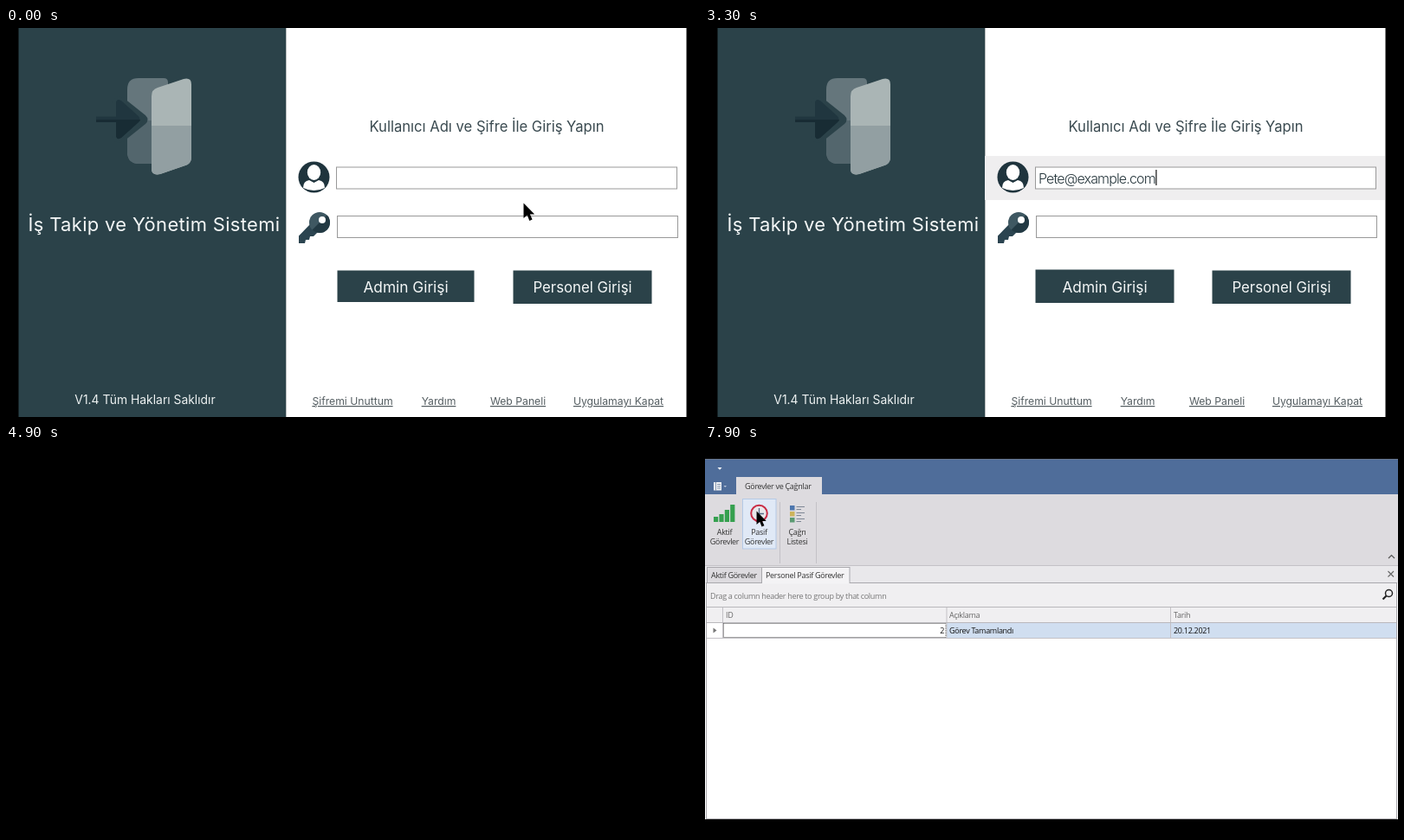
An HTML page for the animation above (8 s loop, 800 by 450 pixels).

```html
<!DOCTYPE html>
<html lang="tr">
<head>
<meta charset="utf-8">
<style>
html, body { margin: 0; width: 100%; height: 100%; overflow: hidden; background: #000; }
svg { display: block; width: 100%; height: 100%; }
text { white-space: pre; }
.login text { font-family: Montserrat, Inter, sans-serif; }
.app text { font: 9px Tahoma, "Open Sans", sans-serif; letter-spacing: -.3px; }
</style>
</head>
<body>
<svg id="stage" viewBox="0 0 800 450"></svg>
<script>
const LOOP = 8000, STEP = 100;
const DARK = '#2b4249', MAIL = 'Pete@example.com';
const typedAt = [1500, 1600, 1800, 2000, 2300, 2500];
while (typedAt.length < MAIL.length) typedAt.push(typedAt.at(-1) + 80);

const rect = (x, y, w, h, fill, more = '') =>
  `<rect x="${x}" y="${y}" width="${w}" height="${h}" fill="${fill}" ${more}/>`;
const path = (d, fill, more = '') => `<path d="${d}" fill="${fill}" ${more}/>`;
const line = (d, color, w = 1) => path(d, 'none', `stroke="${color}" stroke-width="${w}"`);
const circle = (x, y, r, fill, more = '') =>
  `<circle cx="${x}" cy="${y}" r="${r}" fill="${fill}" ${more}/>`;
const text = (s, x, y, fill, more = '') => `<text x="${x}" y="${y}" fill="${fill}" ${more}>${s}</text>`;
const mid = size => `text-anchor="middle" font-size="${size}"`;

// Position on a list of [time, x, y] points
function follow(points, t) {
  const i = points.findIndex(p => p[0] >= t);
  if (i < 0) return points.at(-1).slice(1);
  if (i === 0) return points[0].slice(1);
  const [a, b] = [points[i - 1], points[i]], k = (t - a[0]) / (b[0] - a[0]);
  return [a[1] + (b[1] - a[1]) * k, a[2] + (b[2] - a[2]) * k];
}

const shapes = {
  arrow: path('M-.5 -.5V17L3.7 13.400 6.300 20 9.600 18.600 6.900 12.400H12.200Z', '#000'),
  beam: line('M-3 -8Q0 -8 0 -6V6Q0 8 -3 8M3 -8Q0 -8 0 -6M0 6Q0 8 3 8', '#222'),
  hand: path('M-2 1Q0 -2 2 1V8L4 7 6 8 8 8 11 10V15L8 21H0L-3 15 -6 11Q-6 8 -2 11Z', '#fff',
    'stroke="#1a2428" stroke-width="1" stroke-linejoin="round"')
};
const cursor = (kind, [x, y], scale = 1) =>
  `<g transform="translate(${x} ${y}) scale(${scale})">${shapes[kind]}</g>`;

const door =
  path('M153 58H182Q187 58 187 63V157H154Q140 157 140 143V71Q140 58 153 58Z', '#65767c') +
  path('M140 107H187V157H154Q140 157 140 143Z', '#53666d') +
  path('M122 87Q126 76 136 81L161 101Q166 106 161 111L136 131Q126 136 122 125Z', DARK) +
  path('M104 102.500H127V86Q128 81 133 84L153 102Q156 105.500 153 109L133 127Q128 130 127 125V109H104Z', '#20363f') +
  path('M104 106H155Q155 107.500 153 109L133 127Q128 130 127 125V109H104Z', '#182c34') +
  path('M168 79Q168 71 175 69L205 59Q214 57 214 65V149Q214 157 207 159L178 169Q168 171 168 163Z', '#aab5b5') +
  path('M168 113H214V149Q214 157 207 159L178 169Q168 171 168 163Z', '#929fa2');

const userIcon = circle(355.5, 172.5, 18, '#1f343d') +
  path('M343 185Q343 177 350 176L355.500 179 361 176Q368 177 368 185Q355.500 191 343 185Z', '#fff') +
  '<ellipse cx="355.5" cy="167" rx="7.7" ry="9" fill="#fff"/>';
const keyIcon = path('M352 226L338 240.500V249H345L346 245H350L351 241H355L362 234Z', '#2b4450') +
  circle(362, 225, 12, '#3f5862') + path('M370.500 216.500A12 12 0 0 1 353.500 233.500Z', '#223943') +
  circle(365, 222, 4, '#fff');

const button = (label, x, y, w, h, size) =>
  rect(x, y, w, h, DARK) + text(label, x + w / 2, 306, '#f4f7f7', mid(size));
const link = (label, x) => text(label, x, 436, '#555e62', mid(12.2) + ' text-decoration="underline"');
const field = (x, y) => rect(x, y, 393, 25, '#fff', 'stroke="#999"');
const caret = (x, y, more = '') => rect(x, y, 1.2, 18, '#111', more);

const entering = [[0, 598, 203], [100, 593, 190], [200, 588, 183], [400, 586, 181],
  [600, 586, 181], [1100, 558, 175]];
const leaving = [[4000, 588, 225], [4100, 636, 294], [4200, 640, 298], [4400, 565, 298],
  [4600, 445, 291], [4800, 427, 279]];

function loginCursor(t) {
  if (t < 1500) return cursor(t < 200 ? 'arrow' : 'beam', follow(entering, t));
  if (t < 4000) return '';
  const [x, y] = follow(leaving, t);
  const over = y > 280 && (x > 586 || x < 541) && t < 4700;
  return cursor(over ? 'hand' : 'arrow', [x, y]);
}

function login(t) {
  const focused = t >= 800, typed = MAIL.slice(0, typedAt.filter(a => a <= t).length);
  const dots = (t >= 3700) + (t >= 3800);
  const inMail = focused && t < 3400 && (t < 1300 || t >= 1500), inPassword = t >= 3400 && t < 4300;
  const ink = '#26363c';
  return '<g class="login">' +
    rect(14.5, 0, 309, 450, DARK) + rect(323.3, 0, 462.2, 450, '#fff') + door +
    text('İş Takip ve Yönetim Sistemi', 171, 235, '#f4f7f7', mid(22) + ' letter-spacing=".32"') +
    text('V1.4 Tüm Hakları Saklıdır', 160.5, 435, '#eef2f2', mid(13.9)) +
    text('Kullanıcı Adı ve Şifre İle Giriş Yapın', 555, 120, '#3a4a50', mid(16.6)) +
    (focused ? rect(323, 148, 462, 51, '#efeeef') : '') +
    userIcon + keyIcon + field(381.5, 161) + field(382.5, 217.5) +
    text(typed, 385, 180, ink, 'id="mail" font-size="16" font-weight="300" letter-spacing="-.85"') +
    (inMail ? caret(385, 164, 'id="caret"') : '') +
    [390.5, 400.5].slice(0, dots).map(x => circle(x, 231.5, 3.6, ink)).join('') +
    (inPassword ? caret(385.5 + dots * 10, 221) : '') +
    (focused ? button('Admin Girişi', 381.5, 279.5, 160, 38.5, 17.3)
             : button('Admin Girişi', 382.5, 280.5, 158, 36.5, 17.3)) +
    (t < 4300 ? button('Personel Girişi', 585.5, 280.5, 160, 38.5, 16.8)
              : button('Personel Girişi', 586.5, 281.5, 158, 36.5, 16.8)) +
    link('Şifremi Unuttum', 400) + link('Yardım', 499.5) +
    link('Web Paneli', 591) + link('Uygulamayı Kapat', 707) +
    loginCursor(t) + '</g>';
}

const bars = [6, 9, 14, 20].map((h, i) => rect(10 + i * 6.4, 89 - h, 5.2, h, '#35a04f')).join('');
const clock = circle(62.5, 79, 9.3, '#e9e7ea', 'stroke="#c92c45" stroke-width="2"') +
  line('M62.500 73V79.500H68', '#566a85', 1.3);
const list = ['#4d76ae', '#cdb45c', '#5b9a72'].map((c, i) => {
  const y = 70 + i * 7;
  return rect(98, y, 5.5, 5.5, c) + line(`M105.500 ${y + 1.5}H115M105.500 ${y + 4.5}H111`, '#7d8694');
}).join('');

const GREY = '#c3c1c6', INK = '#333';
const label = (a, b, x) => text(a, x, 104, INK, 'text-anchor="middle"') + text(b, x, 115, INK, 'text-anchor="middle"');

function tab(name, x, w, active) {
  return rect(x + .5, 141.5, w, 18, active ? '#f4f3f5' : '#dddbdf', 'stroke="#a9a8ad"') +
    (active ? line(`M${x + 1} 159.500H${x + w}`, '#f4f3f5', 2) : '') + text(name, x + 5, 153.5, INK);
}

function row([id, note], i) {
  const y = 206 + i * 17, base = y + 12;
  return (i ? '' : rect(279, y, 519, 17, '#d0def0')) +
    line(`M2 ${y + 17.5}H798M20.500 ${y}V${y + 17}M279 ${y}V${y + 17}M537.500 ${y}V${y + 17}`, GREY) +
    (i ? '' : rect(21.5, y + .5, 256.5, 16, '#fff', 'stroke="#444" stroke-dasharray="1 1"') +
      path('M9.500 211.500L13.500 214.500 9.500 217.500Z', '#777')) +
    text(id, 276, base, '#111', 'text-anchor="end"') + text(note, 282, base, '#111') +
    text('20.12.2021', 541, base, '#111');
}

const appFrame =
  rect(0, 16.5, 800, 416.5, '#fff') + rect(0, 16.5, 800, 41, '#4f6d9a') +
  path('M14.500 26H19.500L17 28.800Z', '#fff') +
  rect(10, 43, 9, 9.5, '#f0f2f5') + line('M12.500 43V52.500M14 45.500H18M14 47.800H18M14 50H18', '#6c7f9c', .8) +
  path('M21.500 47H25L23.200 49Z', '#b8c5d8') +
  rect(0, 57, 800, 82, '#dddbdf') + rect(36, 37, 99, 21, '#dddbdf') +
  text('Görevler ve Çağrılar', 46, 50.5, INK) +
  line('M86.500 66V137M128.500 66V137', GREY) + line('M789 131L792.500 127.500 796 131', '#555', 1.2) +
  rect(0, 139, 800, 21, '#e9e8eb') + line('M0 139.500H800', GREY) +
  rect(1.5, 159.5, 797, 273, '#fff', 'stroke="#a9a8ad"') +
  rect(2, 160, 796, 46, '#f0eff1') + line('M2 187.500H798M2 205.500H798', '#b9b8bc') +
  line('M20.500 188V205M279 188V205M537.500 188V205', GREY) +
  text('Drag a column header here to group by that column', 6, 177.5, '#777') +
  text('ID', 24, 199.5, '#666') + text('Açıklama', 282, 199.5, '#666') + text('Tarih', 541, 199.5, '#666') +
  line('M788.500 146L795 152.500M795 146L788.500 152.500', '#666', 1.1) +
  circle(789.5, 171.5, 4, 'none', 'stroke="#222" stroke-width="1.5"') + line('M786.500 174.500L782.500 178.500', '#222', 2.2);

const pointing = [[6800, 92, 122], [6900, 34, 98], [7000, 55, 84], [7100, 60, 77]];

function app(t) {
  const passive = t >= 7700, [x, y] = follow(pointing, t);
  let hover = '';
  if (t >= 6800 && y < 120) {
    const left = x < 43 ? 3.5 : 43.5;
    hover = rect(left, 62.5, 38.5, 57.5, t === 7600 ? '#c9daf2' : '#e0e9f6', 'stroke="#b4c9e6"');
  }
  const rows = passive ? [[2, 'Görev Tamamlandı']] : [[1, 'Görev İletildi.'], [3, 'Lorem Ipsum'], [4, 'Lorem Ipsum']];
  return '<g class="app">' + appFrame + hover + bars + clock + list +
    label('Aktif', 'Görevler', 22.5) + label('Pasif', 'Görevler', 62.5) + label('Çağrı', 'Listesi', 106.5) +
    tab('Aktif Görevler', 2, passive ? 63 : 65, !passive) +
    (passive ? tab('Personel Pasif Görevler', 65, 101.5, true) : '') +
    rows.map(row).join('') +
    (t >= 6800 ? cursor('arrow', [x, y], .88) : '') + '</g>';
}

const stage = document.getElementById('stage');
let shown = -1;
function draw(now) {
  const t = Math.floor(now % LOOP / STEP) * STEP;
  if (t !== shown) {
    shown = t;
    stage.innerHTML = t < 4900 ? login(t) : t < 5200 ? '' : app(t);
    const bar = document.getElementById('caret'), mail = document.getElementById('mail');
    if (bar && mail.textContent) bar.setAttribute('x', 385.5 + mail.getComputedTextLength());
  }
  requestAnimationFrame(draw);
}
requestAnimationFrame(draw);
</script>
</body>
</html>
```
